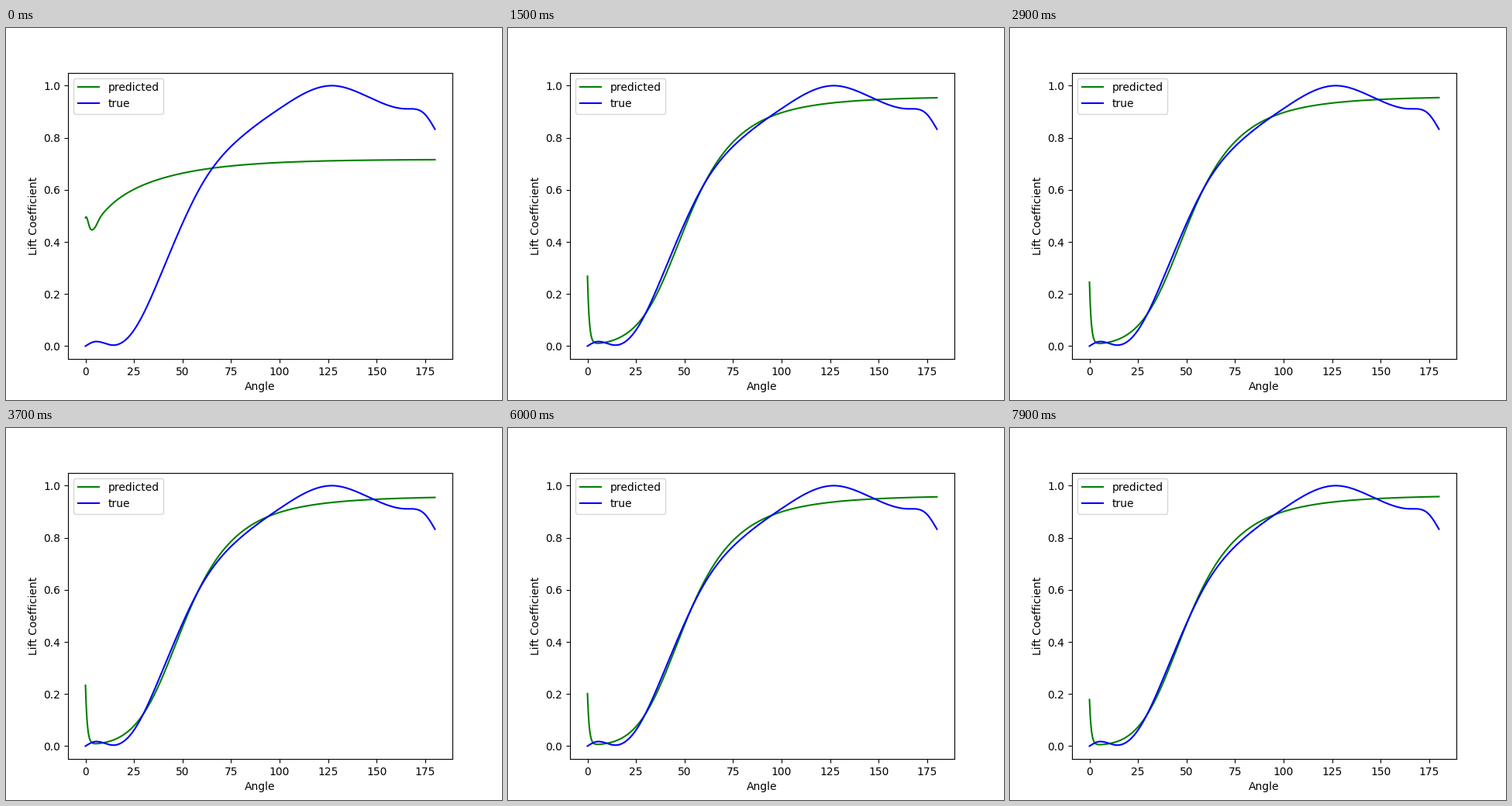
Write a matplotlib script that moves like this. It is 640 px wide and 480 px high and loops after 8 s.

```python
import numpy as np
import matplotlib.pyplot as plt
from matplotlib.animation import FuncAnimation

FRAMES, INTERVAL = 80, 100
angle = np.linspace(0, 180, 1000)


def smooth_curve(points, x):
    """Natural cubic spline, written as a sum of |x - xk|^3 kernels."""
    px, py = np.array(points).T
    px, x = px / 180, x / 180
    line_part = np.column_stack([np.ones_like(px), px])
    system = np.block([[abs(px[:, None] - px) ** 3, line_part],
                       [line_part.T, np.zeros((2, 2))]])
    w = np.linalg.solve(system, np.append(py, [0, 0]))
    return abs(x[:, None] - px) ** 3 @ w[:-2] + w[-2] + w[-1] * x


def bump(center, width):
    return np.exp(-((angle - center) / width) ** 2)


def mix(a, b, u):
    return a + (b - a) * u


true = smooth_curve(
    [(0, 0), (4.5, .0165), (14, .0035), (24, .051), (40, .296), (60, .621),
     (80, .801), (100, .912), (127, 1), (150, .942), (165, .911),
     (175, .889), (180, .833)], angle)

# First guess: slow saturation with a dip near zero.
start = (.717 - .23 * np.exp(-angle / 34) - .09 * np.exp(-angle / 8.5)
         + .096 * bump(0, 1.9) - .012 * bump(5, 2))


def fitted(n):
    """S-curve that slowly sharpens, with a decaying spike at zero."""
    t = np.clip((n - 15) / 64, 0, 1)
    u = t * t * (3 - 2 * t)
    floor = mix(.005, .002, u)
    top = mix(.960, .965, u)
    power = (angle / mix(51.7, 50.9, u)) ** mix(4, 3.9, u)
    curve = floor + (top - floor) * power / (1 + power)
    curve += mix(.025, .015, u) * bump(26, 16)
    spike = .295 * np.exp(-n / 157) - curve[0]
    return curve + spike * np.exp(-angle / .9)


def predicted(n):
    return mix(fitted(n), start, np.exp(-n))


fig, ax = plt.subplots(figsize=(6.4, 4.8), dpi=100)
line, = ax.plot(angle, start, color="green", label="predicted")
ax.plot(angle, true, color="blue", label="true")
ax.set(xlim=(-9, 189), ylim=(-0.05, 1.05),
       xlabel="Angle", ylabel="Lift Coefficient")
ax.legend(loc="upper left")


def update(n):
    line.set_ydata(predicted(n))
    return line,


anim = FuncAnimation(fig, update, frames=FRAMES, interval=INTERVAL,
                     repeat=True, repeat_delay=0)
plt.show()
```
